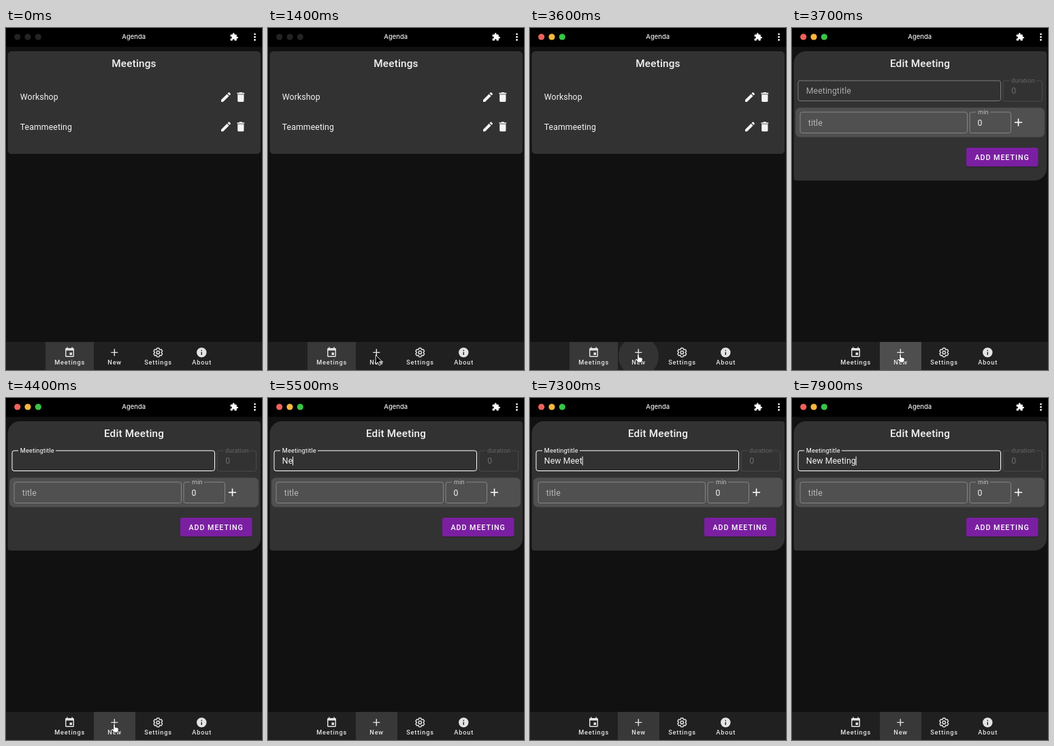
Recreate the animation shown at these times as an HTML page. Size 376x500 px, loop 8 s.

```html
<!DOCTYPE html>
<html lang="en">
<head>
<meta charset="utf-8">
<title>Agenda</title>
<style>
html, body { margin: 0; width: 100%; height: 100%; overflow: hidden; background: #111; }
svg { display: block; width: 376px; height: 500px; }
text { font-family: Roboto, sans-serif; white-space: pre; }
.bar { font: 500 9.4px Inter, sans-serif; fill: #eee; text-anchor: middle; }
.head { font-size: 15.3px; font-weight: 500; letter-spacing: .19px; fill: #f2f2f2; text-anchor: middle; }
.body { font-size: 12.24px; letter-spacing: .115px; fill: #f4f4f4; }
.small { font-size: 9.18px; letter-spacing: .086px; }
.tab { font-size: 9.18px; font-weight: 500; letter-spacing: .82px; fill: #e4e4e4; }
.button { font-size: 10.7px; font-weight: 500; letter-spacing: .956px; fill: #fff; }
.line { fill: none; stroke-width: 1; }
</style>
</head>
<body>
<svg viewBox="0 0 376 500">
  <defs>
    <path id="edit" d="M3 17.25V21h3.75L17.81 9.94l-3.75-3.75zM20.71 7.04c.39-.39.39-1.02 0-1.41l-2.34-2.34c-.39-.39-1.02-.39-1.41 0l-1.83 1.83 3.75 3.75z"/>
    <path id="trash" d="M6 19c0 1.1.9 2 2 2h8c1.1 0 2-.9 2-2V7H6zM19 4h-3.5l-1-1h-5l-1 1H5v2h14z"/>
    <path id="plus" d="M19 13h-6v6h-2v-6H5v-2h6V5h2v6h6z"/>
    <path id="event" d="M17 12h-5v5h5zM16 1v2H8V1H6v2H5c-1.1 0-2 .9-2 2v14c0 1.1.9 2 2 2h14c1.1 0 2-.9 2-2V5c0-1.1-.9-2-2-2h-1V1zM19 19H5V8h14z"/>
    <path id="info" d="M12 2a10 10 0 1 0 0 20 10 10 0 0 0 0-20zm1 15h-2v-6h2zm0-8h-2V7h2z"/>
    <path id="puzzle" d="M20.5 11H19V7c0-1.1-.9-2-2-2h-4V3.5a2.5 2.5 0 0 0-5 0V5H4c-1.1 0-2 .9-2 2v3.8h1.5a2.7 2.7 0 0 1 0 5.4H2V20c0 1.1.9 2 2 2h3.8v-1.5a2.7 2.7 0 0 1 5.4 0V22H17c1.1 0 2-.9 2-2v-4h1.5a2.5 2.5 0 0 0 0-5z"/>
    <g id="gear" fill="none" stroke="#e4e4e4" stroke-width="2" stroke-linejoin="round">
      <path id="teeth"/><circle cx="12" cy="12" r="3"/>
    </g>
    <clipPath id="newTab"><rect x="129" y="459" width="61" height="41"/></clipPath>
  </defs>

  <rect width="376" height="500" fill="#111"/>
  <rect width="376" height="27.5"/>
  <g id="lights"></g>
  <text class="bar" x="187.7" y="16.4">Agenda</text>
  <g id="barIcons" fill="#fff">
    <circle cx="365.5" cy="9" r="1.35"/><circle cx="365.5" cy="13.2" r="1.35"/><circle cx="365.5" cy="17.4" r="1.35"/>
  </g>

  <g id="list">
    <rect x="2.5" y="34" width="371.5" height="150" rx="5.5" fill="#323232"/>
    <text class="head" x="188" y="57">Meetings</text>
    <text class="body" x="20.8" y="105.3">Workshop</text>
    <text class="body" x="20.8" y="148.8">Teammeeting</text>
    <g id="rowIcons" fill="#f4f4f4"></g>
  </g>

  <g id="form">
    <path d="M20.5 34H370a4 4 0 0 1 4 4V205a18 18 0 0 1-18 18H6.500a4 4 0 0 1-4-4V52a18 18 0 0 1 18-18z" fill="#323232"/>
    <text class="head" x="188" y="57">Edit Meeting</text>
    <path id="titleLine" class="line"/>
    <text id="label" class="body" x="20.8">Meetingtitle</text>
    <text id="value" class="body" x="20.8" y="96.2"></text>
    <rect id="caret" y="85.500" width="1" height="13" fill="#fff"/>
    <path id="durLine" class="line" stroke="#4a4a4a"/>
    <text class="small" x="322" y="79.8" fill="#666">duration</text>
    <text class="body" x="322.3" y="96.2" style="fill:#6c6c6c">0</text>
    <rect x="5" y="116.500" width="366" height="43" rx="6.500" fill="#505050"/>
    <path id="itemLine" class="line" stroke="#858585"/>
    <text class="body" x="23.8" y="142.500" style="fill:#b8b8b8">title</text>
    <path id="minLine" class="line" stroke="#858585"/>
    <text class="small" x="273" y="126" fill="#c0c0c0">min</text>
    <text class="body" x="272.500" y="142.500">0</text>
    <g id="addIcon" fill="#fff"></g>
    <rect x="256" y="176.500" width="105.500" height="27.500" rx="3" fill="#000" opacity=".22"/>
    <rect x="256" y="175" width="105.500" height="27.500" rx="3" fill="#7b1fa2"/>
    <text class="button" x="268.500" y="192.600">ADD MEETING</text>
  </g>

  <rect y="459" width="376" height="41" fill="#202020"/>
  <rect id="active" y="459" height="41" fill="#383838"/>
  <circle id="ripple" cx="159.500" cy="480" fill="#fff" clip-path="url(#newTab)"/>
  <g id="tabIcons" fill="#e4e4e4"></g>
  <text class="tab" x="71.200" y="491.500">Meetings</text>
  <text class="tab" x="149.300" y="491.500">New</text>
  <text class="tab" x="203.200" y="491.500">Settings</text>
  <text class="tab" x="273.300" y="491.500">About</text>

  <path id="arrow" d="M0 0V13.500l3.100-2.900 2 4.700 2.200-.9-2-4.600H9.500z" fill="#000" stroke="#fff" stroke-width=".9"/>
  <path id="hand" transform="translate(159 476.500)" fill="#fff" stroke="#111" stroke-width=".8"
    d="M-1.300 1.300Q-1.300 0 0 0T1.300 1.300V4.800L5 5.600Q6.600 6 6.400 7.800L5.500 12.500H-.5L-4 8.200Q-4.300 6.600-2.900 6.700L-1.300 7.900z"/>
</svg>
<script>
const LOOP = 8000, STEP = 100;
const $ = id => document.getElementById(id);
const set = (el, attrs) => { for (const k in attrs) el.setAttribute(k, attrs[k]); return el; };
const show = (id, on) => $(id).style.display = on ? '' : 'none';
const clamp = v => Math.max(0, Math.min(1, v));
const mix = (a, b, k) => a + (b - a) * k;
const easeOut = k => 1 - (1 - k) ** 2;

function add(parent, tag, attrs) {
  return $(parent).appendChild(set(document.createElementNS('http://www.w3.org/2000/svg', tag), attrs));
}

// Place a 24-unit icon by its centre
function icon(parent, name, x, y, s) {
  add(parent, 'use', { href: '#' + name, transform: `translate(${x - 12 * s} ${y - 12 * s}) scale(${s})` });
}

// Rounded outline whose top edge is open from a to b
function outline(l, t, r, b, from, to) {
  const c = 3;
  return `M${to} ${t}H${r - c}a${c} ${c} 0 0 1 ${c} ${c}V${b - c}a${c} ${c} 0 0 1 ${-c} ${c}` +
    `H${l + c}a${c} ${c} 0 0 1 ${-c} ${-c}V${t + c}a${c} ${c} 0 0 1 ${c} ${-c}H${from}`;
}

function gearPath() {
  const pts = [];
  for (let i = 0; i < 6; i++) {
    for (const [r, off] of [[7, -25], [9.2, -13], [9.2, 13], [7, 25]]) {
      const a = (i * 60 + 90 + off) * Math.PI / 180;
      pts.push((12 + r * Math.cos(a)).toFixed(2) + ' ' + (12 + r * Math.sin(a)).toFixed(2));
    }
  }
  return 'M' + pts.join('L') + 'z';
}

const lightColors = ['#f0625a', '#f6b83e', '#38c548'];
const lights = [16.7, 32, 47.3].map(cx => add('lights', 'circle', { cx, cy: 13, r: 4.6 }));
set($('teeth'), { d: gearPath() });
icon('barIcons', 'puzzle', 335, 13.2, .54);
for (const y of [101, 144.3]) {
  icon('rowIcons', 'edit', 323, y, .78);
  icon('rowIcons', 'trash', 344.8, y, .77);
}
icon('addIcon', 'plus', 332.5, 138, .8);
['event', 'plus', 'gear', 'info'].forEach((n, i) => icon('tabIcons', n, [93.5, 159.3, 223.3, 287.3][i], 474.4, .72));
set($('durLine'), { d: outline(310, 77, 367.5, 107, 319, 358) });
set($('itemLine'), { d: outline(12, 123, 257.5, 153.5, 30, 30) });
set($('minLine'), { d: outline(261, 123, 321.5, 153.5, 270, 291) });

const typed = 'New Meeting';
const keys = [5100, 5400, 5700, 6000, 6500, 6800, 7000, 7200, 7400, 7600, 7800];

function drawTitle(t) {
  const k = easeOut(clamp((t - 4200) / 200)), focus = k > 0;
  const mid = 45.5, half = 27.5 * k;
  set($('titleLine'), {
    d: outline(9, 77, 306.5, 106.5, mid - half, mid + half),
    stroke: focus ? '#fff' : '#7c7c7c',
    'stroke-width': focus ? 1.7 : 1
  });
  set($('label'), { y: mix(96.2, 79.8, k) });
  $('label').style.fontSize = mix(12.24, 9.18, k) + 'px';
  $('label').style.fill = focus ? '#fff' : '#aaa';
  $('value').textContent = typed.slice(0, keys.filter(key => key <= t).length);
  show('caret', t >= 4500);
  set($('caret'), { x: 20.6 + $('value').getComputedTextLength() });
}

function drawTabs(t) {
  const isNew = t >= 3700;
  set($('active'), {
    x: isNew ? 129 : 58,
    width: isNew ? 61 : 71,
    fill: isNew && t < keys[0] ? '#3d3d3d' : '#383838'
  });
  show('ripple', t >= 3500 && t < 4300);
  set($('ripple'), {
    r: mix(20, 39, clamp((t - 3500) / 200)),
    opacity: .085 * clamp((4300 - t) / 500)
  });
}

function drawPointer(t) {
  show('arrow', t >= 1100 && t < 3500);
  show('hand', t >= 3500 && t < keys[0]);
  const k = easeOut(clamp((t - 1000) / 600)), nudge = t >= 1900 ? .4 : 0;
  set($('arrow'), { transform: `translate(${mix(158, 158.2, k) + nudge} ${mix(500, 475.3, k) + nudge})` });
}

function draw(time) {
  const t = Math.floor(time % LOOP / STEP) * STEP;
  lights.forEach((el, i) => set(el, { fill: t >= 2400 ? lightColors[i] : '#232323' }));
  show('list', t < 3700);
  show('form', t >= 3700);
  drawTitle(t);
  drawTabs(t);
  drawPointer(t);
}

const start = performance.now();
function tick() {
  draw(performance.now() - start);
  requestAnimationFrame(tick);
}
tick();
</script>
</body>
</html>
```
